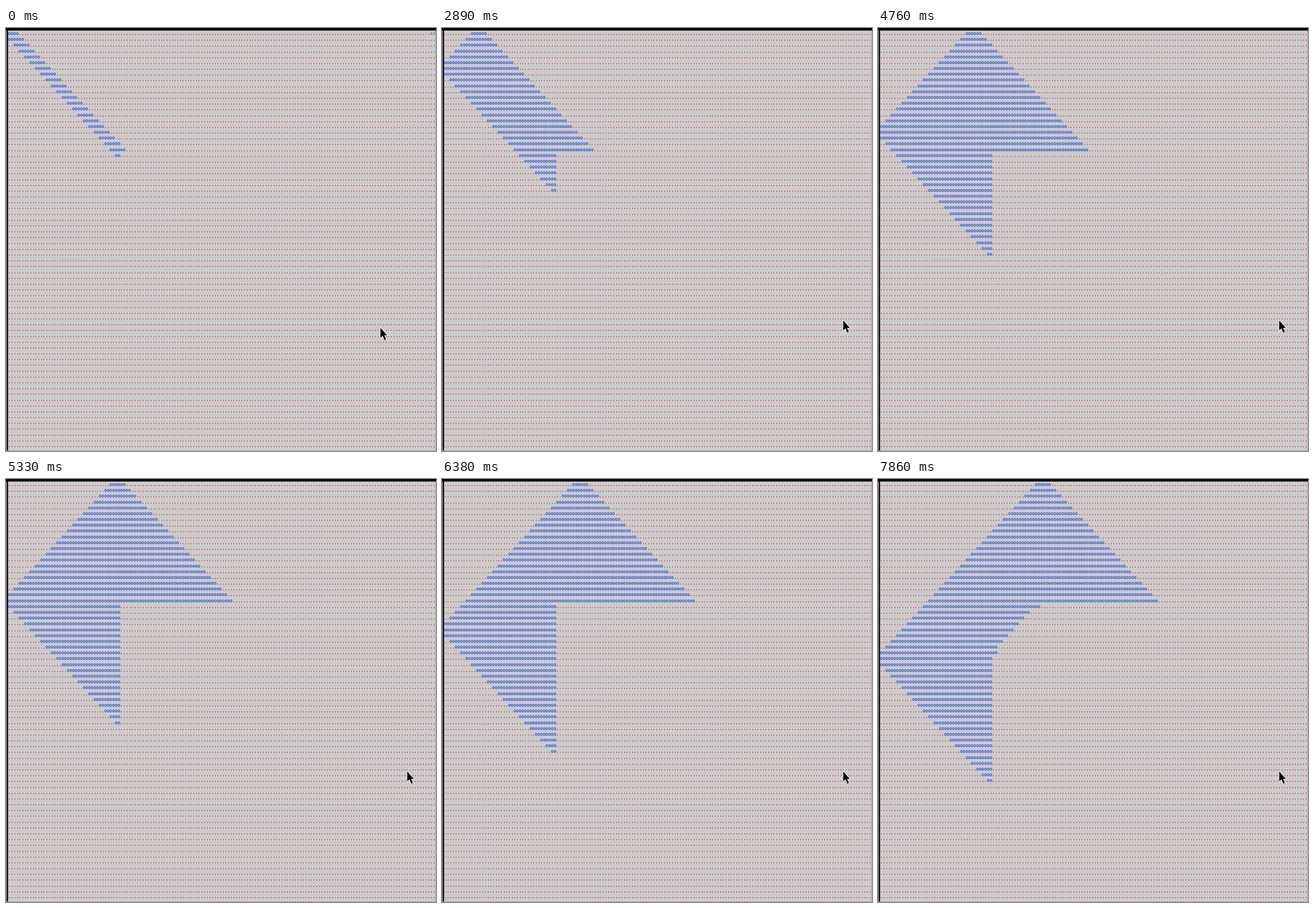
An HTML page with a canvas for the animation above (8 s loop, 755 by 742 pixels).

```html
<!DOCTYPE html>
<html lang="en">
<head>
<meta charset="utf-8">
<title>Grid flood</title>
<style>
  html, body { margin: 0; width: 100%; height: 100%; overflow: hidden; background: #ccc; }
  canvas { display: block; }
</style>
</head>
<body>
<canvas id="stage" width="755" height="742"></canvas>
<script>
const ctx = document.getElementById('stage').getContext('2d');
const LOOP = 8000, COLS = 80, ROWS = 72, SEED = 20;
const CHAR = 4.69, LINE = 10.183, LEFT = 3.6, BASE = 12;
const DOT = 1.86; // left bearing of the period
const RED = '#cc0a16', BLUE = '#1a45dc', GREEN = '#3f9a35';

// The flood's pace: [time, generation].
const PACE = [[0, 1], [1890, 2], [2160, 3], [3610, 12], [5330, 21], [6380, 26], [7860, 31]];

function generation(t) {
  const i = PACE.findIndex(p => p[0] > t);
  if (i < 0) return PACE[PACE.length - 1][1];
  const [t0, g0] = PACE[i - 1], [t1, g1] = PACE[i];
  return Math.floor(g0 + (g1 - g0) * (t - t0) / (t1 - t0) + 1e-6);
}

// First and last live cell of a row, or null.
function span(row, gen) {
  if (row > SEED + gen) return null;
  const first = Math.max(0, gen - 2 - row, row - gen);
  if (row <= SEED) return [first, row + gen];
  return [first, SEED + bulge(row - SEED, 2 * (gen - 26) - 1)];
}

// Cells that spill past the seed column below the seed row.
function bulge(depth, size) {
  if (size < 1 || depth > size) return 0;
  if (depth === 1) return size;
  return Math.max(1, size - depth);
}

function cell(row, col, mark, color) {
  ctx.fillStyle = ctx.strokeStyle = color;
  const y = Math.round(BASE + row * LINE);
  for (let i = 0; i < 2; i++) {
    let x = LEFT + (col * 2 + i) * CHAR;
    if (mark === '.') x = Math.round(x + DOT) - DOT; // keep dots crisp
    ctx.fillText(mark, x, y);
    ctx.strokeText(mark, x, y);
  }
}

function drawPointer(step) {
  ctx.save();
  ctx.translate(657.5 + 23.5 * step, 526 - 6.5 * step);
  const arrow = new Path2D('M0 0V17.5L4 13.8L7 21.5L9.8 20.3L6.8 13H11.5Z');
  ctx.lineWidth = 2;
  ctx.strokeStyle = '#eee';
  ctx.stroke(arrow);
  ctx.fillStyle = '#000';
  ctx.fill(arrow);
  ctx.restore();
}

function draw(gen, step) {
  const box = (color, ...rect) => {
    ctx.fillStyle = color;
    ctx.fillRect(...rect);
  };
  box('#ccc', 0, 0, 755, 742);
  box('#a8a0a8', 754, 0, 1, 742);
  box('#a8a0a8', 0, 741, 755, 1);
  box('#0a060a', 0, 0, 755, 4.5);
  box('#0a060a', 1, 0, 2.6, 741);

  ctx.font = '7.79px "DejaVu Sans Mono", monospace';
  ctx.textRendering = 'geometricPrecision';
  ctx.lineWidth = 0.25;
  for (let row = 0; row < ROWS; row++) {
    const live = span(row, gen);
    for (let col = 0; col < COLS; col++) {
      if (live && col >= live[0] && col <= live[1]) cell(row, col, 'o', BLUE);
      else if (gen === 1 && row === 0 && col === COLS - 1) cell(row, col, 'x', GREEN);
      else cell(row, col, '.', RED);
    }
  }
  drawPointer(step);
}

const begin = performance.now();
let shown = '';

function tick(now) {
  const t = Math.max(0, now - begin) % LOOP;
  const gen = generation(t);
  const step = Math.min(2, Math.floor(t / 150));
  const key = gen + ':' + step;
  if (key !== shown) {
    draw(gen, step);
    shown = key;
  }
  requestAnimationFrame(tick);
}
tick(begin);
</script>
</body>
</html>
```
